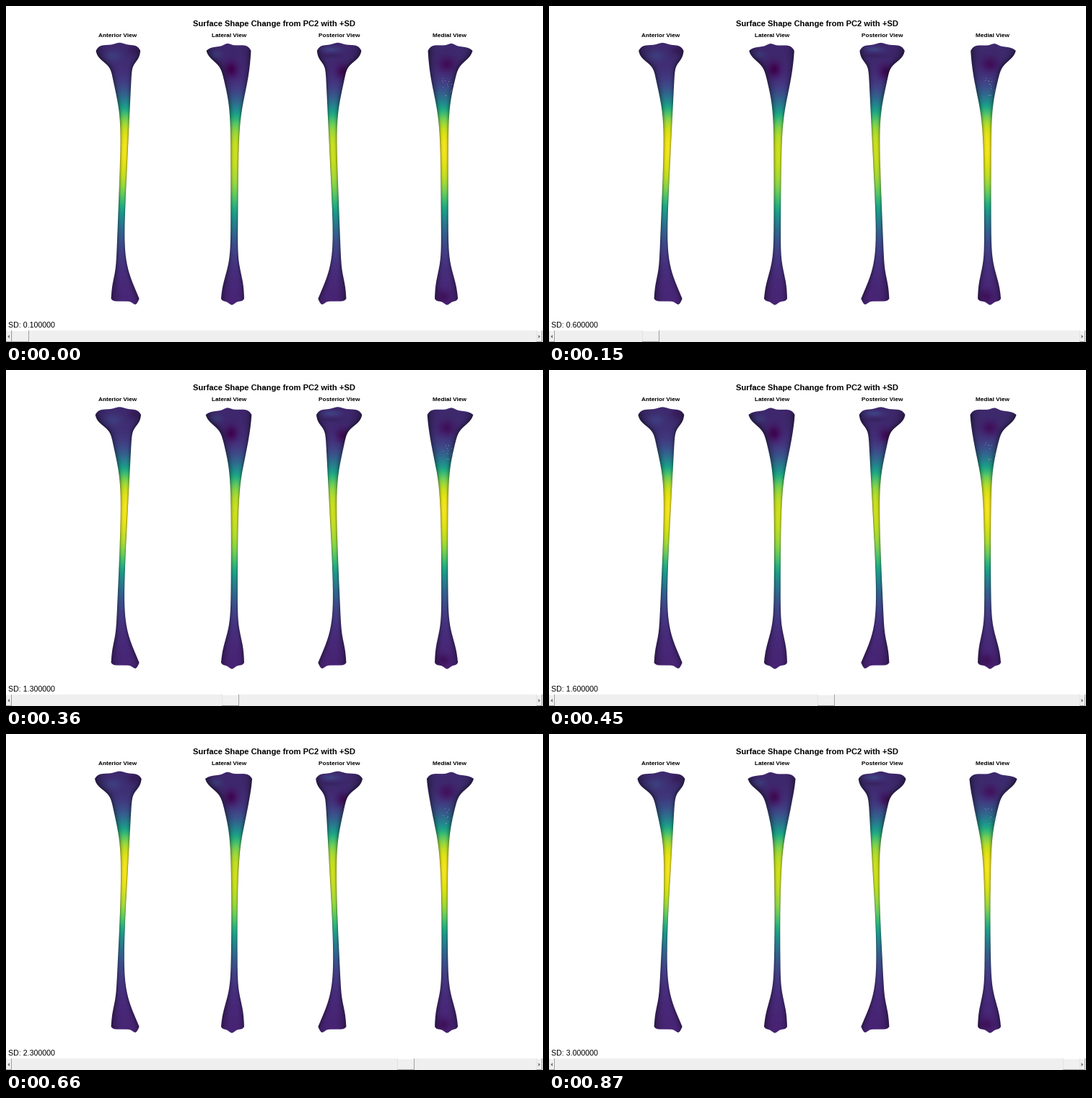
Animation of 744x465 px, one loop 0.9 s. Source, as a matplotlib script:

```python
import numpy as np
import matplotlib as mpl
import matplotlib.pyplot as plt
from matplotlib.animation import FuncAnimation
from matplotlib.patches import Polygon, Rectangle
from matplotlib.path import Path

W, H, DPI = 744, 465, 100
STEPS, INTERVAL = 30, 30
PT = 72 / DPI
TOP, BOTTOM = 62, 405
VIRIDIS = mpl.colormaps["viridis"]

plt.rcParams["font.family"] = "Liberation Sans"
plt.rcParams["toolbar"] = "None"

# A side edge is a straight line (x at y=200, slope) plus soft steps
# (amount, centre, width); a negative width steps towards the foot.
FRONT = dict(
    left=(158.8, -0.0385, [(-20, 77, 4.5), (-22, 115, 22), (-5.5, 377, -8)]),
    right=(168.8, -0.048, [(11, 77, 4), (42, 395, -22)]),
    ramp=0, spine=(0.53, 0.14), ankle=(0.88, 0.14),
)
SIDE = dict(
    left=(311.3, 0, [(-20, 76, 5), (-16, 108, 18), (-14.5, 373, -13)]),
    right=(322, -0.008, [(17.5, 120, 22), (10, 370, -11)]),
    ramp=4, spine=(0.47, 0.1), ankle=(0.47, 0.17),
)

# Blobs: x, y, x spread, y spread, colour value change, brightness change
VIEWS = [
    dict(label="Anterior View", x=154.5, shape=FRONT, mirror=None, ridge=0.6, peak=1, lag=0,
         blobs=[(177, 62, 8, 7, -0.03, -0.1), (148, 70, 12, 8, 0.05, 0.06)]),
    dict(label="Lateral View", x=309, shape=SIDE, mirror=None, ridge=0.6, peak=0.94, lag=7,
         blobs=[(312, 89, 9, 11, -0.12, -0.04), (290, 68, 9, 6, 0.06, 0.05)]),
    dict(label="Posterior View", x=462, shape=FRONT, mirror=617, ridge=0.42, peak=0.94, lag=4,
         blobs=[(450, 61, 13, 4, 0.08, 0.08), (450, 70, 15, 2.5, 0, -0.1),
                (466, 92, 9, 10, -0.1, -0.06)]),
    dict(label="Medial View", x=614.5, shape=SIDE, mirror=924, ridge=0.5, peak=1, lag=0,
         blobs=[(611, 82, 12, 11, -0.1, -0.02), (606, 402, 10, 9, -0.05, -0.12)]),
]


def step(y, centre, width):
    return 1 / (1 + np.exp((y - centre) / width))


def bump(v, centre, width):
    return np.exp(-((v - centre) / width) ** 2)


def edges(shape, y, t):
    """Left and right edge at height y: the head widens and the shaft thins with t."""
    y = np.clip(y, TOP, BOTTOM)
    grow = t * (2.3 * step(y, 80, 8) - 1.3 * bump(y, 250, 80))
    sides = []
    for name, out in (("left", -1), ("right", 1)):
        x0, slope, steps = shape[name]
        x = x0 + slope * (y - 200) + out * grow
        sides.append(x + sum(a * step(y, c, w) for a, c, w in steps))
    return sides


def outline(view, t):
    shape = view["shape"]
    y = np.linspace(TOP, BOTTOM, 160)
    left, right = edges(shape, y, t)
    u = 0.5 - 0.5 * np.cos(np.linspace(0, np.pi, 60))
    flat = 1 - (2 * u - 1) ** 8
    head = TOP - flat * (8 - t - shape["ramp"] * (1 - u) ** 2 + 3.2 * bump(u, *shape["spine"]))
    foot = BOTTOM + flat * (3.7 + 5 * bump(u, *shape["ankle"]))
    x = np.concatenate([left[0] + (right[0] - left[0]) * u, right,
                        (left[-1] + (right[-1] - left[-1]) * u)[::-1], left[::-1]])
    if view["mirror"]:
        x = view["mirror"] - x
    return np.column_stack([x, np.concatenate([head, y, foot[::-1], y[::-1]])])


def surface(view, t):
    """Colour map with soft shading around the view's window."""
    x0 = int(view["x"]) - 42
    x = np.arange(x0, x0 + 84)[None, :] + 0.5
    y = np.arange(46, 418)[:, None] + 0.5
    left, right = edges(view["shape"], y, t)
    if view["mirror"]:
        left, right = view["mirror"] - right, view["mirror"] - left
    u = np.clip((x - left) / (right - left), 0, 1)
    c = view["ridge"]
    n = np.where(u < c, (c - u) / c, (u - c) / (1 - c))
    head = np.clip((110 - y) / 40, 0, 1)
    shade = 1 - 0.12 * head - 0.4 * n ** (3 + 2 * head)
    ys = y - view["lag"]
    band = step(ys, 141 - 13 * t, -15) * step(ys, 283 - 11 * t, 25)
    value = (0.1 + 0.03 * head + 0.93 * band) * view["peak"]
    for bx, by, sx, sy, dv, ds in view["blobs"]:
        g = bump(x, bx, sx) * bump(y, by, sy)
        value, shade = value + dv * g, shade + ds * g
    rgb = VIRIDIS(np.clip(value, 0.005, 1))[..., :3]
    return np.clip(rgb * shade[..., None], 0, 1)


fig = plt.figure(figsize=(W / DPI, H / DPI), dpi=DPI, facecolor="white")
ax = fig.add_axes([0, 0, 1, 1])


def text(x, y, s, px, **kw):
    return ax.text(x, y, s, fontsize=px * PT, va="baseline", color="black", **kw)


def box(x, y, w, h, color):
    return ax.add_patch(Rectangle((x, y), w, h, fc=color, ec="none", lw=0, zorder=4))


def raised(x, w):
    """Bevelled scrollbar part; returns (patch, offset) pairs."""
    y, h = 449, 16
    parts = [(0, y, w, h, "#f0f0f0"), (0, y, w, 1, "#ffffff"), (0, y, 1, h, "#e3e3e3"),
             (w - 1, y, 1, h, "#a0a0a0"), (0, y + h - 1, w, 1, "#a0a0a0")]
    return [(box(x + dx, py, pw, ph, col), dx) for dx, py, pw, ph, col in parts]


text(371.5, 28, "Surface Shape Change from PC2 with +SD", 11.1, ha="center", weight="bold")
sd_label = text(3.3, 445, "", 10.6, ha="left")

bones = []
for view in VIEWS:
    text(view["x"], 43, view["label"], 8.3, ha="center", weight="bold")
    x0 = int(view["x"]) - 42
    img = ax.imshow(surface(view, 0), extent=(x0, x0 + 84, 418, 46),
                    interpolation="nearest", zorder=2)
    bones.append((view, img))

# Tiny glints on the medial surface
rng = np.random.default_rng(4)
SPOTS = np.column_stack([rng.normal(611.5, 3.5, 26), rng.uniform(99, 125, 26)])
glints = ax.scatter([], [], s=0.5, marker="s", lw=0, alpha=0.65, zorder=3)

box(0, 449, W, 16, "#efefef")
thumb = raised(8, 24)
for bx, tip in ((0, -1), (735, 1)):
    raised(bx, 8)
    cx = bx + 3.8
    ax.add_patch(Polygon([(cx + 1.4 * tip, 457.5), (cx - 1.2 * tip, 455), (cx - 1.2 * tip, 460)],
                         fc="#707070", ec="none", zorder=5))

ax.set_xlim(0, W)
ax.set_ylim(H, 0)
ax.set_aspect("auto")
ax.axis("off")


def update(i):
    t = i / (STEPS - 1)
    sd_label.set_text(f"SD: {(i + 1) / 10:.6f}")
    for view, img in bones:
        img.set_data(surface(view, t))
        img.set_clip_path(Path(outline(view, t)), ax.transData)
    pick = np.random.default_rng(i).permutation(len(SPOTS))[:13]
    glints.set_offsets(SPOTS[pick])
    glints.set_facecolor(["#86a8cc" if k % 3 else "#c8a888" for k in pick + i])
    x = 8 + round(704 * t)
    for part, dx in thumb:
        part.set_x(x + dx)
    return []


anim = FuncAnimation(fig, update, frames=STEPS, interval=INTERVAL, repeat=True,
                     repeat_delay=0, blit=False)
plt.show()
```
